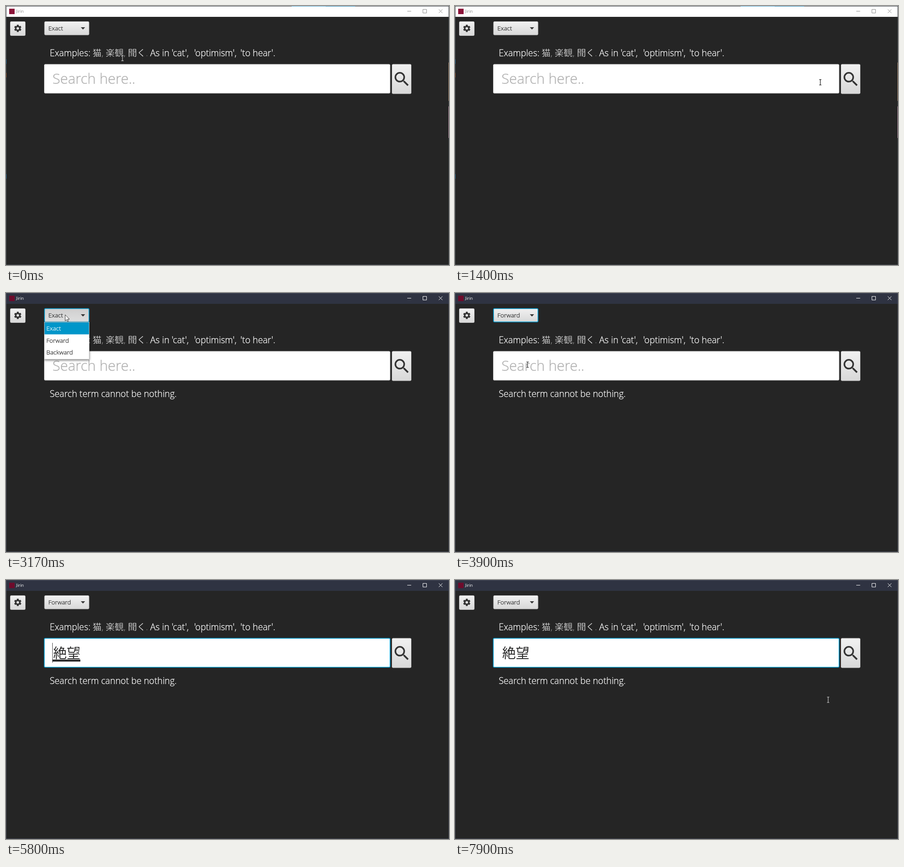
An HTML page for the animation above (8 s loop, 977x573 px).

```html
<!DOCTYPE html>
<html lang="ja">
<head>
<meta charset="utf-8">
<title>Dictionary search</title>
<style>
  html, body { margin: 0; width: 100%; height: 100%; overflow: hidden; background: #252525; }
  svg { display: block; width: 100%; height: 100%; isolation: isolate; }
  text { font-family: "Open Sans", "Noto Sans CJK JP", "Noto Sans CJK", sans-serif; font-weight: 300; white-space: pre; }
  .label { font-size: 19.75px; fill: #fff; stroke: #fff; stroke-width: .3; }
  .cjk { font-size: 19.75px; stroke: #252525; stroke-width: .45; }
  .control { font-size: 13.5px; fill: #222; stroke: #222; stroke-width: .25; }
  .control.selected { fill: #fff; stroke: #fff; }
  .kana { font-family: "Noto Sans CJK JP", "Noto Sans CJK", sans-serif; font-size: 30px; fill: #2b2b2b; }
  #prompt { font-size: 31.25px; fill: #b0b0b0; stroke: #b0b0b0; stroke-width: .35; }
  #title { font-size: 9.3px; font-weight: 400; }
</style>
</head>
<body>
<svg viewBox="0 0 977 573">
  <defs>
    <linearGradient id="face" x2="0" y2="1"><stop stop-color="#f1f1f1"/><stop offset="1" stop-color="#d8d8d8"/></linearGradient>
    <linearGradient id="hover" x2="0" y2="1"><stop stop-color="#fff"/><stop offset="1" stop-color="#e3e3e3"/></linearGradient>
    <linearGradient id="pressed" x2="0" y2="1"><stop stop-color="#cfcfcf"/><stop offset="1" stop-color="#dedede"/></linearGradient>
    <linearGradient id="shine" x2="1" y2="1"><stop stop-color="#8a8a8a"/><stop offset=".5" stop-color="#606060"/><stop offset=".75" stop-color="#222"/></linearGradient>
    <filter id="shadow" x="-20%" y="-20%" width="140%" height="150%"><feDropShadow dx="0" dy="2" stdDeviation="2.5" flood-opacity=".5"/></filter>
  </defs>

  <rect width="977" height="573" fill="#252525"/>
  <rect id="titleBar" width="977" height="24"/>
  <rect id="logo" x="7" y="6" width="12" height="12"/>
  <text id="title" x="22.5" y="15.3">Jirin</text>
  <path id="windowIcons" d="M885 11.5h8.5M919.5 7.5h8v8h-8zM954.5 7.5l8 8m0-8l-8 8" fill="none"/>
  <rect id="frame" x=".5" y=".5" width="976" height="572" fill="none"/>
  <g id="desktop" fill="none">
    <path d="M630 .5h75" stroke="#4ba3cf"/>
    <path d="M705 .5h65" stroke="#1d7fb0"/>
    <path d="M.5 118v10M.5 372v10" stroke="#3279a8"/>
    <path d="M.5 148v10" stroke="#a2603a"/>
    <path d="M976.5 125v85" stroke="#b99a80"/>
    <path d="M976.5 222v70" stroke="#c7a4b6"/>
  </g>

  <rect x="9.5" y="34.5" width="33" height="31" rx="2" fill="url(#face)" stroke="#c4c4c4"/>
  <path transform="translate(16.4 39.9) scale(.8)" fill="#333" d="M19.43 12.98c.04-.32.07-.64.07-.98s-.03-.66-.07-.98l2.11-1.65c.19-.15.24-.42.12-.64l-2-3.46c-.12-.22-.39-.3-.61-.22l-2.49 1c-.52-.4-1.08-.73-1.69-.98l-.38-2.65C14.46 2.18 14.25 2 14 2h-4c-.25 0-.46.18-.49.42l-.38 2.65c-.61.25-1.17.59-1.69.98l-2.49-1c-.23-.09-.49 0-.61.22l-2 3.46c-.13.22-.07.49.12.64l2.11 1.65c-.04.32-.07.65-.07.98s.03.66.07.98l-2.11 1.65c-.19.15-.24.42-.12.64l2 3.46c.12.22.39.3.61.22l2.49-1c.52.4 1.08.73 1.69.98l.38 2.65c.03.24.24.42.49.42h4c.25 0 .46-.18.49-.42l.38-2.65c.61-.25 1.17-.59 1.69-.98l2.49 1c.23.09.49 0 .61-.22l2-3.46c.12-.22.07-.49-.12-.64zM12 15.5a3.5 3.5 0 1 1 0-7 3.5 3.5 0 0 1 0 7z"/>

  <rect id="combo" x="85" y="34.5" width="98" height="29.5" rx="2"/>
  <text id="choice" class="control" x="93.5" y="54.3"></text>
  <path d="M165 47h9.5l-4.75 5z" fill="#333"/>

  <g class="label">
    <text x="96.5" y="111">Examples:</text>
    <text class="cjk" x="191" y="111">猫,</text>
    <text class="cjk" x="220" y="111">楽観,</text>
    <text class="cjk" x="269" y="111">聞く.</text>
    <text x="318" y="111">As in 'cat',</text>
    <text x="415" y="111">'optimism',</text>
    <text x="517" y="111">'to hear'.</text>
    <text id="message" x="96.5" y="230">Search term cannot be nothing.</text>
  </g>

  <rect id="field" x="84.5" y="129" width="762.5" height="64" rx="2" fill="#fff"/>
  <text id="prompt" x="102.5" y="172">Search here..</text>
  <text id="entry" class="kana" x="104" y="172"></text>
  <rect id="underline" x="102" fill="#2b2b2b"/>
  <rect id="caret" y="139" width="1" height="44" fill="#444"/>

  <rect id="searchButton" x="851.5" y="129" width="42" height="65" rx="2" stroke="#c4c4c4"/>
  <path id="lens" transform="translate(851.7 140.7) scale(1.77)" d="M15.5 14h-.79l-.28-.27A6.47 6.47 0 0 0 16 9.5 6.5 6.5 0 1 0 9.5 16c1.61 0 3.09-.59 4.23-1.57l.27.28v.79l5 4.99L20.49 19zm-6 0a4.5 4.5 0 1 1 0-9 4.5 4.5 0 0 1 0 9z"/>

  <g id="popup">
    <rect x="84.5" y="64.5" width="99" height="82" fill="#fff" stroke="#bdbdbd" filter="url(#shadow)"/>
    <rect id="hoverRow" x="85" y="91.5" width="98" height="26.5" fill="#cce3f4"/>
    <rect x="85" y="65" width="98" height="26.5" fill="#0096c9"/>
    <text class="control selected" x="89" y="83">Exact</text>
    <text class="control" x="89" y="109.5">Forward</text>
    <text class="control" x="89" y="136.3">Backward</text>
  </g>

  <path id="arrow" d="M0 0V13.5L3.2 10.6 5.2 15.2 7.2 14.3 5.2 9.8H9.5Z" fill="#fff" stroke="#222" stroke-width=".9"/>
  <path id="beam" d="M-2.5-6h2l.5.5.5-.5h2M0-5.5v11M-2.5 6h2l.5-.5.5.5h2" fill="none" stroke="#fff" stroke-width="1.1" style="mix-blend-mode:difference"/>
</svg>

<script>
const LOOP = 8000;
const ui = Object.fromEntries([...document.querySelectorAll('[id]')].map(el => [el.id, el]));

// Pointer way points: time, x, y
const pointerPath = [
  [0, 257, 115], [350, 212, 150], [600, 248, 173], [870, 285, 171], [900, 287, 171],
  [1200, 600, 178], [1460, 866, 166], [1930, 874.5, 159], [2050, 872, 160],
  [2280, 620, 146], [2480, 359, 134], [2780, 185, 68], [3000, 130.5, 48],
  [3170, 130.5, 48], [3500, 135, 104], [3730, 135, 104], [3880, 160, 158.5],
  [6930, 160, 158.5], [7200, 560, 172], [7420, 870, 170], [7560, 906, 202],
  [7730, 860, 237], [7900, 823, 265]
];

// Input method steps: time, text
const typing = [
  [0, ''], [4600, 'ｚ'], [4870, 'ぜ'], [5070, 'ぜｔ'], [5230, 'ぜつ'],
  [5330, 'ぜつｂ'], [5470, 'ぜつぼ'], [5730, 'ぜつぼう'], [5800, '絶望']
];

const ACTIVATE = 1530, MESSAGE = 1670, OPEN = 3170, CHOOSE = 3730,
      FOCUS = 4030, COMPOSE = 4600, CONVERT = 5800, COMMIT = 6170;

function pointerAt(t) {
  const next = pointerPath.findIndex(point => point[0] > t);
  if (next < 0) return pointerPath.at(-1).slice(1);
  const [t0, x0, y0] = pointerPath[next - 1], [t1, x1, y1] = pointerPath[next];
  const k = (t - t0) / (t1 - t0);
  return [x0 + (x1 - x0) * k, y0 + (y1 - y0) * k];
}

const set = (el, attributes) => {
  for (const name in attributes) el.setAttribute(name, attributes[name]);
};
const show = (el, visible) => set(el, { visibility: visible ? 'visible' : 'hidden' });

function drawWindow(active) {
  set(ui.titleBar, { fill: active ? '#2f3342' : '#fff' });
  set(ui.logo, { fill: active ? '#6d0c2c' : '#8c1439' });
  set(ui.title, { fill: active ? '#fff' : '#8c8c8c' });
  set(ui.windowIcons, { stroke: active ? '#fff' : '#8c8c8c' });
  set(ui.frame, { stroke: active ? '#464b59' : '#454a50' });
  show(ui.desktop, !active);
}

function drawEntry(t) {
  const text = typing.findLast(step => step[0] <= t)[1];
  const composing = t >= COMPOSE && t < COMMIT;
  const converting = composing && t >= CONVERT;
  const width = text.length * 30;
  const blinkStart = t < COMPOSE ? FOCUS : COMMIT;
  ui.entry.textContent = text;
  show(ui.prompt, t < FOCUS);
  show(ui.underline, composing);
  set(ui.underline, { y: converting ? 176 : 177, width: width + 2, height: converting ? 4.5 : 2 });
  show(ui.caret, t >= FOCUS && (composing || (t - blinkStart) % 1000 < 500));
  set(ui.caret, { x: converting ? 102 : 103.5 + width });
  set(ui.field, { stroke: t >= FOCUS ? '#039ed3' : '#c8c8c8', 'stroke-width': t >= FOCUS ? 1.6 : 1 });
}

function draw(t) {
  const [x, y] = pointerAt(t);
  const open = t >= OPEN && t < CHOOSE;
  const comboFocused = t >= OPEN && t < FOCUS;
  const overSearch = x >= 851 && x <= 894 && y >= 129 && y <= 194;
  const overCombo = x >= 84 && x <= 184 && y >= 34 && y <= (open ? 147 : 65);

  drawWindow(t >= ACTIVATE);
  drawEntry(t);
  show(ui.message, t >= MESSAGE);

  ui.choice.textContent = t < CHOOSE ? 'Exact' : 'Forward';
  set(ui.combo, {
    fill: open ? 'url(#pressed)' : 'url(#face)',
    stroke: comboFocused ? '#039ed3' : '#c4c4c4',
    'stroke-width': comboFocused ? 1.6 : 1
  });
  ui.popup.style.display = open ? '' : 'none';
  show(ui.hoverRow, open && y > 91.5);

  set(ui.searchButton, { fill: overSearch ? 'url(#hover)' : 'url(#face)' });
  set(ui.lens, { fill: overSearch ? 'url(#shine)' : '#333' });

  const arrow = overSearch || overCombo;
  show(ui.arrow, arrow);
  show(ui.beam, !arrow);
  set(arrow ? ui.arrow : ui.beam, { transform: `translate(${x} ${y})` });
}

const start = performance.now();
function tick() {
  draw((performance.now() - start) % LOOP);
  requestAnimationFrame(tick);
}
tick();
</script>
</body>
</html>
```
